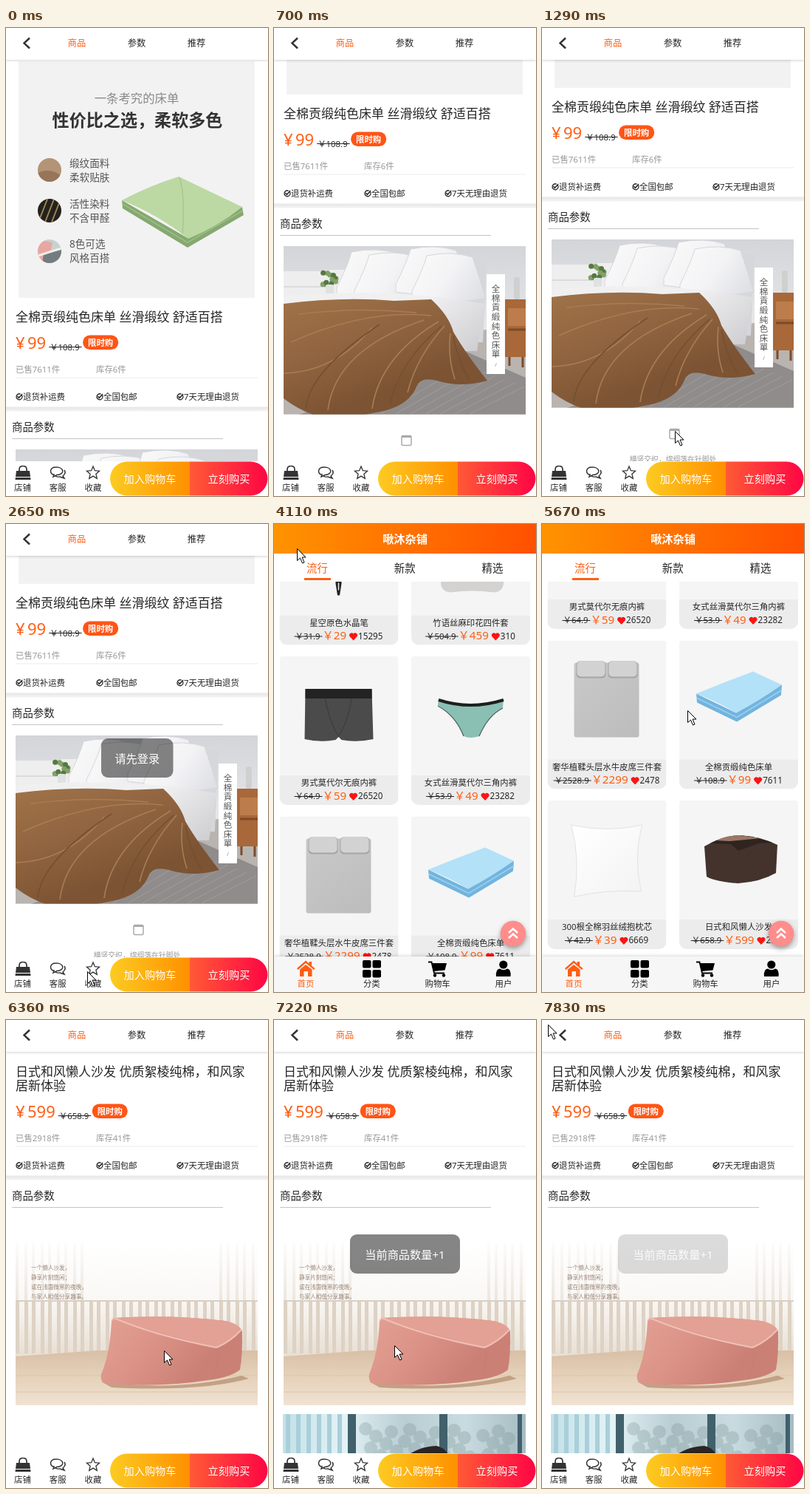
An HTML page with a canvas that plays this animation: 355x633 px, repeating every 7.99 s.

```html
<!DOCTYPE html>
<html lang="zh-CN">
<head>
<meta charset="utf-8">
<title>Shop walkthrough</title>
<style>
html, body { margin: 0; height: 100%; overflow: hidden; background: #fff }
canvas { display: block }
</style>
</head>
<body>
<canvas id="stage" width="355" height="633"></canvas>
<script>
const ctx = document.getElementById('stage').getContext('2d');
const LOOP = 7990, ORANGE = '#ff5e14', INK = '#262626', SMALL = 11.4;
const FONT = '"Noto Sans","Noto Sans CJK SC",sans-serif';

const clamp = v => Math.max(0, Math.min(1, v));
const ramp = (t, a, b) => clamp((t - a) / (b - a));
const ease = p => p * p * (3 - 2 * p);

// y is the visual centre of the line
function text(s, x, y, size, color = INK, align = 'left', weight = 400) {
  ctx.font = `${weight} ${size}px ${FONT}`;
  ctx.fillStyle = color;
  ctx.textAlign = align;
  ctx.fillText(s, x, y + size * 0.37);
  return ctx.measureText(s).width;
}
function rect(x, y, w, h, color, radius = 0) {
  ctx.fillStyle = color;
  ctx.beginPath();
  ctx.roundRect(x, y, w, h, radius);
  ctx.fill();
}
function fill(d, color) {
  ctx.fillStyle = color;
  ctx.fill(new Path2D(d));
}
function line(d, color, width = 1) {
  ctx.strokeStyle = color;
  ctx.lineWidth = width;
  ctx.stroke(new Path2D(d));
}
function disc(x, y, r, color) {
  ctx.fillStyle = color;
  ctx.beginPath();
  ctx.arc(x, y, r, 0, 7);
  ctx.fill();
}
function gradient(x0, y0, x1, y1, ...colors) {
  const g = ctx.createLinearGradient(x0, y0, x1, y1);
  colors.forEach((c, i) => g.addColorStop(i / (colors.length - 1), c));
  return g;
}
function at(x, y, draw) {
  ctx.save();
  ctx.translate(x, y);
  draw();
  ctx.restore();
}
function picture(x, y, w, h, draw, radius = 0) {
  at(x, y, () => {
    ctx.beginPath();
    ctx.roundRect(0, 0, w, h, radius);
    ctx.clip();
    draw();
  });
}
function shadow(color, blur, dy, draw) {
  ctx.save();
  Object.assign(ctx, { shadowColor: color, shadowBlur: blur, shadowOffsetY: dy });
  draw();
  ctx.restore();
}

// ---------- product detail page ----------
function sheetHero() {
  rect(0, 0, 320, 320, '#f2f2f2');
  text('一条考究的床单', 160, 50, 16.4, '#8a8a8a', 'center', 300);
  text('性价比之选，柔软多色', 161, 79, 23.1, '#333', 'center', 700);
  ['缎纹面料', '柔软贴肤', '活性染料', '不含甲醛', '8色可选', '风格百搭'].forEach((s, i) =>
    text(s, 69, 138 + (i >> 1) * 54.5 + i % 2 * 19, 13.6, '#555', 'left', 500));
  picture(26, 131, 32, 32, () => {
    rect(0, 0, 32, 32, '#b39476');
    fill('M0 20Q16 12 32 24V32H0Z', '#98755a');
  }, 16);
  picture(26, 186, 32, 32, () => {
    rect(0, 0, 32, 32, '#24211e');
    for (let i = 0; i < 5; i++) line(`M${i * 9 - 9} 34L${i * 9 + 5} -2`, '#a08a55', 1.8);
  }, 16);
  picture(26, 241, 32, 32, () => {
    rect(0, 0, 32, 32, '#c5d3cf');
    fill('M0 0L20 4L14 32H0Z', '#e9a7a4');
    fill('M8 20L32 14V32H6Z', '#737c80');
    line('M0 22L32 12', '#f2efe8', 3);
  }, 16);
  fill('M140 188L229 239L303 197L305 208L229 252L141 199Z', '#86a871');
  fill('M140 188Q178 168 217 156L303 197Q270 224 230 240Q190 208 140 188Z', '#bcd9a3');
  line('M141 193L229 245L304 202M218 157Q226 180 222 234', '#a3c48a', 1.2);
}

function bedPhoto() {
  rect(0, 0, 328, 228, gradient(0, 0, 0, 110, '#d3d5d9', '#e6e6e8'));
  fill('M190 124L328 106V228H0V190Z', '#b9b4b0');
  fill('M20 228Q180 180 232 136L328 178V228Z', '#8f8c8b');
  for (let i = 0; i < 9; i++) line(`M${90 + i * 20} 228L${222 + i * 13} ${150 + i * 5}`, '#a09d9b', 1);
  rect(0, 32, 84, 50, '#eeeeef');
  line('M0 33H62M0 55H60M60 55V82', '#c8c9cb');
  for (let i = 0; i < 12; i++) disc(62 + 9 * Math.cos(i * 2.4), 44 + 8 * Math.sin(i * 1.9), 3.5, i % 2 ? '#55793f' : '#83a06b');
  rect(57, 52, 11, 13, '#dfe2e3', 2);
  fill('M84 20H275L270 130H84Z', '#d5d7da');
  const pillow = 'M4 52Q20 20 24 4Q58 -3 86 6Q94 30 104 62Q54 70 4 62Z';
  for (const [x, y] of [[68, 4], [92, 8], [148, 0], [170, 9]]) at(x, y, () => {
    fill(pillow, gradient(10, 0, 100, 60, '#fafafa', '#f3f3f5', '#dedfe4'));
    line(pillow, '#d6d7dc');
  });
  fill('M0 68Q140 55 272 78L262 142H0Z', gradient(200, 70, 260, 142, '#f0f0f1', '#cfcfd2'));
  rect(300, 72, 28, 78, '#a9683a');
  rect(304, 84, 24, 24, '#bd7c4b');
  line('M304 113H328M306 150V162M324 150V164', '#7b4a29', 3);
  rect(312, 42, 8, 30, '#cfd0cf', 3);
  fill('M0 78Q80 68 150 74L200 72Q224 94 230 116Q246 144 276 182Q240 192 208 182Q186 176 180 190Q172 212 140 222L110 228H40Q18 220 0 206Z',
    gradient(0, 70, 60, 228, '#a07349', '#916540', '#7c5333'));
  line('M20 92Q100 82 180 90M10 130Q110 85 200 94M60 222Q70 140 190 100M120 220Q130 150 210 102M168 198Q180 150 218 108M232 180Q222 150 226 118M0 172Q70 170 120 110', '#a97d53', 1.6);
  line('M30 220Q34 170 130 106M144 214Q158 155 214 108M252 182Q236 155 230 122', '#74502f', 1.6);
  rect(275, 38, 25, 135, '#fff');
  [...'全棉貢緞純色床單'].forEach((c, i) => text(c, 287.5, 58 + i * 12.6, 11.5, '#555', 'center'));
  text('/', 287.5, 160, 7, '#888', 'center');
}

function sofaPhoto() {
  rect(0, 0, 328, 220, gradient(0, 0, 0, 150, '#ffffff', '#faf8f5', '#e9e0d5'));
  for (let i = 0; i < 30; i++) {
    const x = i * 11 + i * i % 4, side = i < 9 || i > 24;
    if (side) rect(x, 0, 4, 80, gradient(0, 0, 0, 80, '#fdfcfb', '#ebe6de'));
    rect(x, 78, 5, 72, '#ddd2c4');
  }
  rect(0, 78, 328, 2, '#d9cfc3');
  fill('M0 154L110 146H328V220H0Z', gradient(0, 146, 0, 220, '#d8c0a6', '#e6d2bb', '#f0e2d2'));
  line('M0 180H328M0 202H328', '#dcc6ac');
  ['一个懒人沙发，', '静享片刻悠闲；', '或在浅霭微寒的夜晚，', '与家人相偕分享趣事。'].forEach((s, i) =>
    text(s, 21, 34 + i * 13.2, 7.6, '#9a8478'));
  fill('M116 188Q220 202 306 180L316 184Q250 202 130 196Z', '#c2a184');
  fill('M133 102Q210 97 284 106Q302 110 307 120Q308 150 304 172Q292 182 262 186Q200 196 124 191Q114 190 116 178Q128 150 130 106Z',
    gradient(115, 100, 230, 195, '#e2a094', '#dc9387', '#cb8075'));
  fill('M133 102Q210 97 284 106Q302 110 306 118Q288 136 272 142Q190 122 133 102Z', '#e3a195');
  line('M130 106L133 102Q190 126 272 142Q290 135 306 118', '#efc0b5', 2);
  line('M272 143Q278 164 266 185', '#c47d72', 1);
}

function windowPhoto() {
  rect(0, 0, 329, 60, gradient(0, 0, 329, 0, '#c3e0e8', '#e4f3f6', '#b9cdd3', '#c9dbe0', '#a5bcc2'));
  for (let i = 0; i < 26; i++) disc(112 + i * 53 % 205, 20 + i * 17 % 42, 9, 'rgba(120,145,145,.3)');
  for (let i = 0; i < 6; i++) rect(4 + i * 14, 0, 6, 60, '#a9cfda');
  for (const [x, w] of [[88, 11], [212, 11], [318, 6]]) rect(x, 0, w, 60, '#40606c');
  fill('M164 60Q182 44 208 43Q222 46 226 60Z', '#2b2523');
}

function check(x, y) {
  line(`M${x + 8.3} ${y - 2}A4 4 0 1 1 ${x + 6.6} ${y - 3.4}`, INK, 1.3);
  line(`M${x + 2.4} ${y - .4}L${x + 4.4} ${y + 1.8}L${x + 9} ${y - 3.4}`, INK, 1.5);
}

// y is the centre of the price row
function productInfo(y, p) {
  p.title.forEach((s, i) => text(s, 13, y - 34.5 - 19.5 * (p.title.length - 1 - i), 17));
  text('¥', 13, y, 22, ORANGE);
  const x = 37 + text(p.price, 29, y, 22, ORANGE);
  const w = text('￥' + p.old, x - 3, y + 6, SMALL);
  line(`M${x - 4} ${y + 6}h${w + 4}`, INK);
  rect(x + 42, y - 10, 48, 19.5, '#ff5516', 9.5);
  text('限时购', x + 66, y, SMALL, '#fff', 'center', 700);
  text(`已售${p.sold}件`, 13, y + 36, SMALL, '#999');
  text(`库存${p.stock}件`, 122, y + 36, SMALL, '#999');
  rect(13, y + 47, 328, 1, '#ececec');
  [[13, '退货补运费'], [122, '全国包邮'], [231, '7天无理由退货']].forEach(([cx, s]) => {
    check(cx, y + 73);
    text(s, cx + 10, y + 73, SMALL);
  });
  rect(0, y + 87, 355, 6, gradient(0, y + 87, 0, y + 93, '#e6e6e6', '#f4f4f4'));
  text('商品参数', 8, y + 114, 14.4);
  rect(8, y + 129.5, 286, 1, '#c4c4c4');
}

function detailChrome() {
  shadow('rgba(0,0,0,.18)', 3, 1, () => rect(0, 0, 355, 43, '#fff'));
  line('M32 13.5L24.5 20.5L32 27.5', '#333', 2.4);
  text('商品', 96, 20.5, 12.3, ORANGE, 'center');
  text('参数', 177, 20.5, 12.3, INK, 'center');
  text('推荐', 258, 20.5, 12.3, INK, 'center');

  rect(0, 586, 355, 47, '#fff');
  fill('M14 599H32L33.5 611H12.5Z', '#333');
  line('M18 602V597Q18 592.5 23 592.5Q28 592.5 28 597V602', '#333', 1.7);
  line('M13 607.5H33', '#fff', 1);
  line('M68 594C58 594 59 604 65 604L64 607L69 604.5C80 604 79 594 68 594Z', '#333', 1.5);
  line('M79 598Q82 602 77 606L79 609L73 607Q69 607.5 67 606', '#333', 1.5);
  let star = '';
  for (let i = 0; i < 10; i++) {
    const a = i * Math.PI / 5, r = i % 2 ? 4.1 : 9;
    star += `${i ? 'L' : 'M'}${118 + r * Math.sin(a)} ${602 - r * Math.cos(a)}`;
  }
  line(star + 'Z', '#333', 1.3);
  ['店铺', '客服', '收藏'].forEach((s, i) => text(s, 22.5 + i * 47.7, 621.5, SMALL, INK, 'center'));
  rect(141, 586.5, 108, 46, gradient(141, 0, 249, 0, '#fccb22', '#ff9000'), [23, 0, 0, 23]);
  rect(249, 586.5, 105.5, 46, gradient(249, 0, 355, 0, '#ff5a36', '#ff0544'), [0, 23, 23, 0]);
  text('加入购物车', 195, 610, 14.2, '#fff', 'center');
  text('立刻购买', 302, 610, 14.2, '#fff', 'center');
}

const SHEET = { title: ['全棉贡缎纯色床单 丝滑缎纹 舒适百搭'], price: '99', old: '108.9', sold: 7611, stock: 6 };
const SOFA = { title: ['日式和风懒人沙发 优质絮棱纯棉，和风家', '居新体验'], price: '599', old: '658.9', sold: 2918, stock: 41 };

function sheetPage(t) {
  const scroll = 284 * ease(ramp(t, 40, 780));
  at(0, -Math.round(scroll), () => {
    picture(17, 45, 320, 320, sheetHero);
    productInfo(425.5, SHEET);
    picture(13, 570, 328, 227.5, bedPhoto);
    ctx.beginPath();
    ctx.roundRect(173, 826.5, 13, 13, 2);
    ctx.strokeStyle = '#aaa';
    ctx.lineWidth = 1.5;
    ctx.stroke();
    rect(173, 826, 13, 3, '#aaa');
    text('横竖交织，绵绸落在针脚处', 177.5, 867.5, 9.8, '#999', 'center');
  });
  detailChrome();
  toast('请先登录', 129, 97.5, Math.min(ramp(t, 2040, 2170), 1 - ramp(t, 3080, 3270)));
}

function sofaPage(t) {
  productInfo(123.5, SOFA);
  picture(13, 301, 328, 220, sofaPhoto);
  if (t > 6450) picture(12, 533, 329, 60, windowPhoto);
  detailChrome();
  toast('当前商品数量+1', 103, 149, Math.min(ramp(t, 6800, 6920), 1 - ramp(t, 7700, 7886)));
}

function toast(s, x, w, alpha) {
  ctx.globalAlpha = alpha;
  rect(x, 290, w, 53, 'rgba(0,0,0,.48)', 9);
  // the label stays white longer than its backdrop stays dark
  ctx.globalAlpha = clamp(alpha * 3);
  text(s, x + w / 2, 317, 15.2, '#fff', 'center');
  ctx.globalAlpha = 1;
}

// ---------- home page ----------
const PRODUCTS = [
  ['星空原色水晶笔', '31.9', 29, 15295, () => {
    fill('M76 30H84V118L81.5 134H78.5L76 118Z', '#222');
    line('M80 117V127', '#eee', 1.5);
  }],
  ['竹语丝麻印花四件套', '504.9', 459, 310, () => {
    fill('M40 50H125V118Q124 129 112 130Q82 126 53 130Q41 129 40 118Z', '#d3d2d1');
    for (let i = 0; i < 30; i++) disc(46 + i * 29 % 74, 56 + i * 17 % 68, 1.7, '#b9b7b6');
  }],
  ['男式莫代尔无痕内裤', '64.9', 59, 26520, () => {
    fill('M35 44H125L127 112Q104 117 84 113L80 109L76 113Q56 117 34 112Z', '#4b4b4c');
    line('M62 57Q68 90 80 108Q92 90 98 57', '#3c3c3d', 1.2);
    rect(35, 44, 90, 13, '#232324');
  }],
  ['女式丝滑莫代尔三角内裤', '53.9', 49, 23282, () => {
    fill('M37 58Q80 74 125 58L124 70Q104 80 92 108Q80 112 71 108Q60 80 36 66Z', '#8abfb3');
    line('M36 67Q60 80 71 108M124 70Q104 80 92 108', '#45605a', 1.2);
    line('M37 59Q80 73 125 59', '#1d1f1f', 4);
  }],
  ['奢华植鞣头层水牛皮席三件套', '2528.9', 2299, 2478, () => {
    rect(36, 30, 88, 101, gradient(36, 30, 124, 131, '#c9c9c9', '#bcbcbc'), 3);
    for (const x of [39, 82]) {
      rect(x, 28, 40, 23, '#a5a5a5', 5);
      rect(x + 1, 28, 38, 21, '#d2d2d2', 5);
    }
  }],
  ['全棉贡缎纯色床单', '108.9', 99, 7611, () => {
    fill('M23 72L77 98L139 60L138 74L78 110L24 84Z', '#72b4de');
    fill('M23 72Q62 56 100 42L139 60Q108 82 77 98Q50 82 23 72Z', '#b3e1f8');
    line('M24 78L78 104L139 67', '#9bd0ef', 1.5);
  }],
  ['300根全棉羽丝绒抱枕芯', '42.9', 39, 6669, () => {
    const cushion = 'M32 33Q80 44 128 33Q116 78 127 123Q80 120 36 130Q45 80 32 33Z';
    fill(cushion, gradient(40, 40, 120, 130, '#fff', '#f3f3f3'));
    line(cushion, '#e2e2e2');
  }],
  ['日式和风懒人沙发', '658.9', 599, 2918, () => {
    fill('M34 62Q58 48 82 47Q112 49 133 60L131 98Q110 110 80 112Q50 110 37 103Z', '#43332c');
    fill('M42 58Q60 48 82 47Q106 49 126 57L108 58L80 68L70 59Z', '#2f2420');
    fill('M50 54Q64 47 82 47L110 51L90 53L68 55Z', '#9b7765');
  }]
];

function card(x, y, [name, old, price, likes, draw]) {
  picture(x, y, 161, 201, () => {
    rect(0, 0, 161, 161, '#f5f5f5');
    rect(0, 161, 161, 40, '#ececec');
    draw();
  }, [4, 4, 10, 10]);
  text(name, x + 80.5, y + 171, SMALL, INK, 'center');
  const rowY = y + 189;
  const width = (s, size) => (ctx.font = `${size}px ${FONT}`, ctx.measureText(s).width);
  const oldW = width('￥' + old, SMALL), priceW = width('￥' + price, 15.2), likesW = width(likes, 11.7);
  let left = x + 80.5 - (oldW + priceW + likesW + 19) / 2;
  text('￥' + old, left, rowY, SMALL);
  line(`M${left - 1} ${rowY + .5}h${oldW + 4}`, INK);
  left += oldW + 3;
  text('￥' + price, left, rowY - 1, 15.2, ORANGE);
  left += priceW + 4;
  at(left, rowY - 4.5, () => fill('M5.5 10.5L.8 5.4A3 3 0 0 1 5.5 1.5A3 3 0 0 1 10.2 5.4Z', '#fb1414'));
  text(likes, left + 12, rowY, 11.7);
}

function homePage(t) {
  const scroll = Math.round(238 * ease(ramp(t, 5000, 5600)));
  PRODUCTS.forEach((p, i) => card(i % 2 ? 186 : 7.5, -37.5 + (i >> 1) * 216.5 - scroll, p));

  rect(0, 40, 355, 38, '#fff');
  rect(0, 0, 355, 40, gradient(0, 0, 355, 0, '#ff9300', '#ff5000'));
  text('啾沐杂铺', 177.5, 20.5, 15.2, '#fff', 'center', 700);
  ['流行', '新款', '精选'].forEach((s, i) => text(s, 58.5 + i * 118.7, 60, 14.4, i ? INK : ORANGE, 'center'));
  rect(41, 73, 36, 3, ORANGE);

  shadow('rgba(0,0,0,.35)', 6, 3, () => disc(324, 554, 17.3, '#ff8d8b'));
  line('M318 553L324 547.5L330 553M318 560L324 554.5L330 560', '#fff', 2.5);

  shadow('rgba(0,0,0,.15)', 4, -1, () => rect(0, 585, 355, 48, '#f6f6f6'));
  fill('M31 601L43 590.5L47.5 594.5V592H51V597.5L55.5 601L54 603L43 593.8L32.5 603Z', ORANGE);
  fill('M35 602.5L43 596L51.5 602.5V612H46V605H40.5V612H35Z', ORANGE);
  for (const x of [120, 133.5]) for (const y of [590, 603]) rect(x, y, 11.5, 10.5, '#000', 2);
  fill('M213.5 594H234L231.5 603.5L216 605Z', '#000');
  line('M209 592.5H213.5L217 607.5H231', '#000', 1.8);
  disc(218, 610.5, 2.2, '#000');
  disc(230, 610.5, 2.2, '#000');
  fill('M301 612Q300 602 306 601.5Q311 605 316 601.5Q321.5 602 320.5 612Z', '#000');
  disc(310.8, 596, 5.6, '#000');
  ['首页', '分类', '购物车', '用户'].forEach((s, i) => text(s, 43 + i * 89.3, 622, SMALL, i ? INK : ORANGE, 'center'));
}

// ---------- pointer ----------
// [time, x, y] along each visible stretch
const STROKES = [
  [[1000, 262, 242], [1290, 180, 545], [1780, 108, 611], [1850, 110, 605], [2700, 110, 605], [3100, 226, 330]],
  [[3580, 23, 2], [3650, 33, 25], [3880, 32, 20], [3960, 31, 25], [4100, 31, 33], [4800, 31, 37],
    [5080, 197, 250], [5670, 197, 250], [5750, 214, 442], [5810, 214, 447], [6400, 214, 447],
    [6750, 190, 600], [7050, 190, 600], [7600, 104, 86], [7750, 8, 6], [LOOP, 8, 6]]
];

function pointer(t) {
  const stroke = STROKES.find(s => t >= s[0][0] && t < s[s.length - 1][0]);
  if (!stroke) return;
  const i = stroke.findIndex(k => k[0] > t);
  const [t0, x0, y0] = stroke[i - 1], [t1, x1, y1] = stroke[i];
  const p = ramp(t, t0, t1);
  at(Math.round(x0 + (x1 - x0) * p) + .5, Math.round(y0 + (y1 - y0) * p) + .5, () => {
    const arrow = 'M0 0V16L4 12.5L7 19.5L9.5 18.5L6.6 11.5H11.5Z';
    fill(arrow, '#fff');
    line(arrow, '#000');
  });
}

function frame(now) {
  const t = now % LOOP;
  rect(0, 0, 355, 633, '#fff');
  (t < 4110 ? sheetPage : t < 5990 ? homePage : sofaPage)(t);
  pointer(t);
  requestAnimationFrame(frame);
}
requestAnimationFrame(frame);
</script>
</body>
</html>
```
